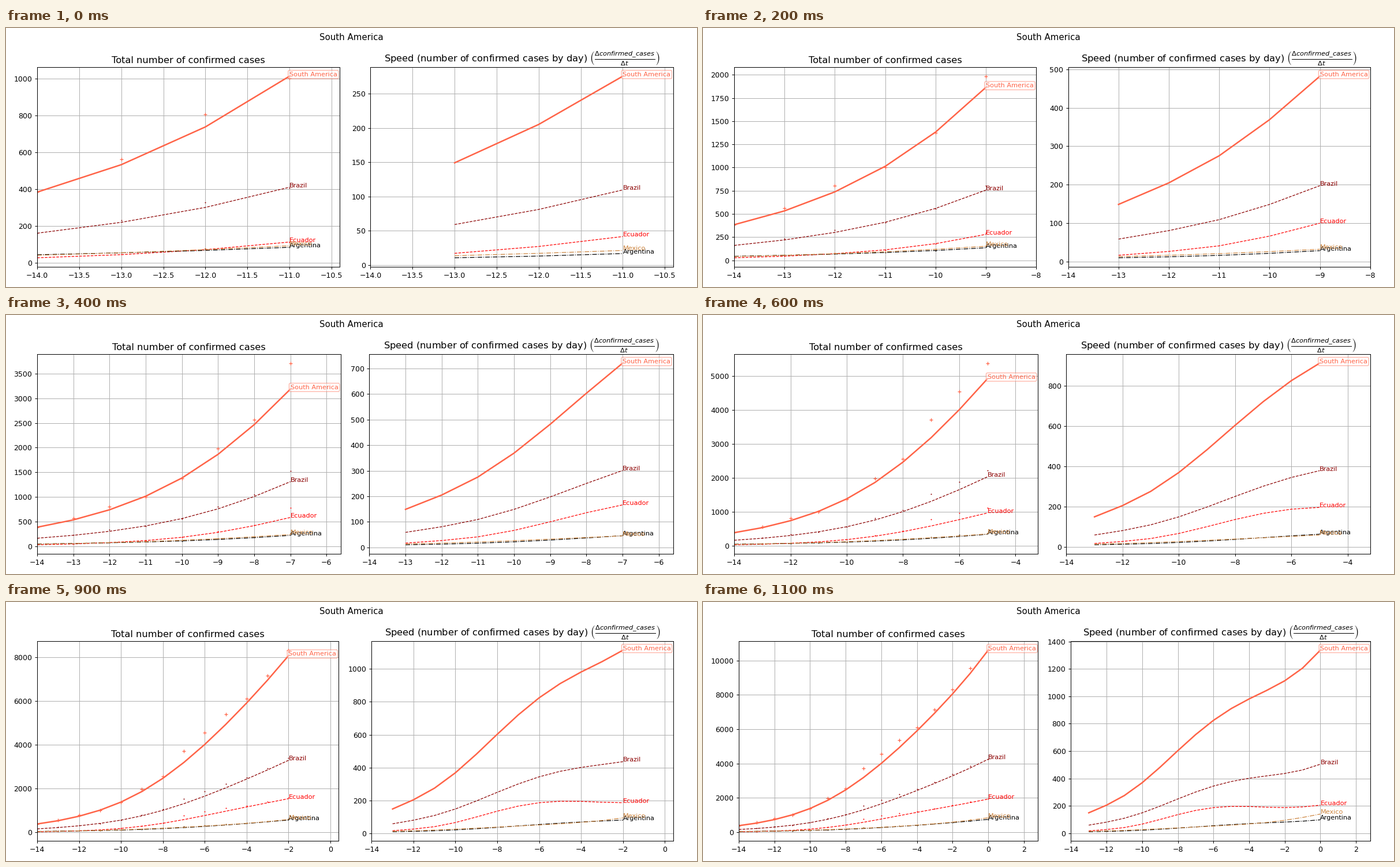
These frames come from a looping animation (1197 by 450 pixels, 4100 ms). A matplotlib script:

```python
import numpy as np
import matplotlib.pyplot as plt
from matplotlib.animation import FuncAnimation
from numpy.polynomial import Polynomial

W, H, DPI = 1197, 450, 90
STATES, FRAMES, STEP_MS = 12, 41, 100
FIRST_DAY, LAST = -14, 14
TOP, BOTTOM, RIGHT = 382, 35, 1155.8
PAD, TICK, GUTTER = 13.5, 8.75, 16.35
DRAFT_WIDTH = 440  # axes width assumed when measuring label overhang

T = np.arange(LAST + 1)
KEYS = (1, 2, 4, 7, 11, 13, 14)


class Region:
    """Daily speed is a smooth curve through key values; totals add it up."""

    def __init__(self, name, color, style, start, lift, *speeds):
        self.name, self.color, self.style = name, color, style
        self.main = style == "-"
        self.speed = Polynomial.fit(KEYS, speeds, len(KEYS) - 1)(T[1:])
        self.total = start + np.append(0, np.cumsum(self.speed))
        self.reported = self.total * (1 + deviation(lift))


def deviation(lift):
    """Reported counts wobble early, jump after a week, then run 3% ahead."""
    wobble = 0.08 * np.cos(2 * np.pi * (T - 1.7) / 3.6) * np.exp(-(T / 6) ** 2)
    jump = np.where(T >= 7, np.maximum(0, 1 - (T - 7) / 3.1), 0)
    inside = (T > 0) & (T < LAST)
    return inside * (0.03 + wobble + lift * jump)


REGIONS = [
    Region("South America", "tomato", "-", 384, 0.155,
           149, 205, 369, 720.5, 1044, 1206, 1337),
    Region("Brazil", "darkred", "--", 161, 0.16,
           59, 81, 149, 301, 419, 462, 504),
    Region("Ecuador", "red", "--", 27.5, 0.33,
           17, 27, 66.7, 166.5, 190, 192, 205),
    Region("Argentina", "black", "-.", 44, 0.18,
           10.5, 13, 22, 46, 76, 88, 98),
    Region("Mexico", "peru", "-.", 41, 0.07,
           13.5, 17, 26.5, 45.5, 79, 115, 140),
]

TITLES = (
    "Total number of confirmed cases",
    r"Speed (number of confirmed cases by day) "
    r"$\left(\frac{\Delta confirmed\_cases}{\Delta t}\right)$",
)

fig = plt.figure(figsize=(W / DPI, H / DPI), dpi=DPI, facecolor="white")
fig.suptitle("South America", fontsize=12)
axes = [fig.add_axes([x, 0.1, 0.4, 0.75]) for x in (0.05, 0.55)]


def curve(ax, region, days, values):
    ax.plot(days, values, region.style, color=region.color,
            lw=2 if region.main else 1)
    box = dict(boxstyle="round,pad=0.2", facecolor="white",
               edgecolor=region.color, alpha=0.5) if region.main else None
    ax.text(days[-1], values[-1], region.name, color=region.color,
            fontsize=9, bbox=box)


def last_label(axis):
    """Position and pixel width of the highest visible tick label."""
    end = axis.get_view_interval()[1]
    ticks = [t for t in axis.get_majorticklocs() if t <= end + 1e-9]
    text = axis.get_major_formatter().format_ticks(ticks)[-1]
    return ticks[-1], sum(7.95 if c.isdigit() else 4 if c == "." else 10.5
                          for c in text)


def place(ax, left, width):
    ax.set_position([left / W, BOTTOM / H, width / W, (TOP - BOTTOM) / H])


def layout():
    """Fit two equal axes around their tick labels."""
    y_room = [TICK + last_label(ax.yaxis)[1] for ax in axes]
    x, x_width = last_label(axes[0].xaxis)
    start, end = axes[0].get_xlim()
    overhang = x_width / 2 - DRAFT_WIDTH * (end - x) / (end - start)
    left = PAD + y_room[0]
    gap = max(GUTTER, PAD + overhang) + y_room[1]
    width = (RIGHT - left - gap) / 2
    place(axes[0], left, width)
    place(axes[1], left + width + gap, width)


def draw(frame):
    n = min(frame, STATES - 1) + 4
    days = FIRST_DAY + T[:n]
    for ax, title in zip(axes, TITLES):
        ax.clear()
        ax.set_title(title, fontsize=13)
        ax.grid(True)
    for region in REGIONS:
        axes[0].plot(days, region.reported[:n], "+", color=region.color,
                     ms=5 if region.main else 2,
                     mew=1 if region.main else 0.8)
        curve(axes[0], region, days, region.total[:n])
        curve(axes[1], region, days[1:], region.speed[:n - 1])
    for ax in axes:
        ax.set_xlim(FIRST_DAY, FIRST_DAY + 1.2 * (n - 1))
    layout()
    return []


anim = FuncAnimation(fig, draw, frames=FRAMES, interval=STEP_MS,
                     repeat=True, repeat_delay=0, blit=False)
plt.show()
```
